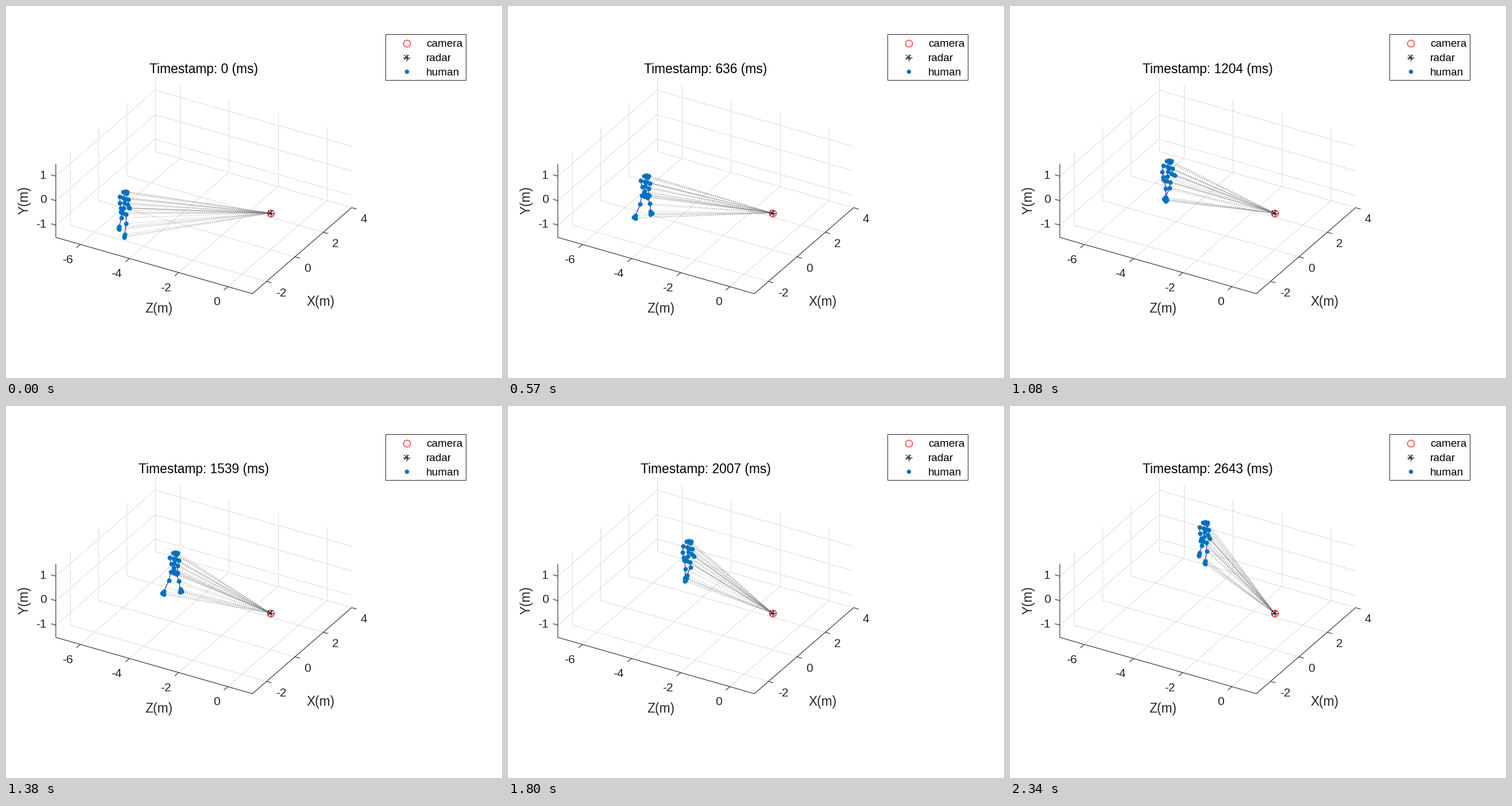
Recreate the animation shown at these times as a matplotlib script. Size 864 by 648 pixels, loop 2370 ms.

```python
import numpy as np
import matplotlib.pyplot as plt
from matplotlib.animation import FuncAnimation
from matplotlib.collections import LineCollection
from matplotlib.patches import Rectangle

W, H, FRAMES, STEP_MS = 864, 648, 79, 30
DARK, GRID, BLUE = "#262626", "#dbdbdb", "#0072bd"
plt.rcParams["font.family"] = "Liberation Sans"

# 72 dpi makes one point equal to one pixel; whole coordinates are pixel centres
fig = plt.figure(figsize=(W / 72, H / 72), dpi=72, facecolor="white")
ax = fig.add_axes([0, 0, 1, 1])
ax.set(xlim=(-0.5, W - 0.5), ylim=(H - 0.5, -0.5))
ax.axis("off")

ORIGIN = np.array([460, 360.1])
UX, UY, UZ = np.array([24.7, -21.4]), np.array([0, -42.7]), np.array([42.8, 12.25])


def project(x, y, z):
    return ORIGIN + x * UX + y * UY + z * UZ


def segments(segs, color, width=1.0, z=1, **kw):
    return ax.add_collection(LineCollection(segs, colors=color, linewidths=width, zorder=z, **kw))


def label(x, y, s, size, color=DARK, ha="center", va="baseline", **kw):
    return ax.text(x - 0.5, y - 0.5, s, fontsize=size, color=color, ha=ha, va=va, zorder=6, **kw)


def draw_axes():
    x0, x1, y0, y1, z0, z1 = -3, 4, -1.5, 1.5, -7, 1
    xs, ys, zs = (-2, 0, 2, 4), (-1, 0, 1), (-6, -4, -2, 0)
    grid = []
    for x in xs:
        grid.append([project(x, y0, z0), project(x, y0, z1)])
        grid.append([project(x, y0, z0), project(x, y1, z0)])
    for z in zs:
        grid.append([project(x0, y0, z), project(x1, y0, z)])
        grid.append([project(x1, y0, z), project(x1, y1, z)])
    for y in ys:
        grid.append([project(x0, y, z0), project(x1, y, z0)])
        grid.append([project(x1, y, z0), project(x1, y, z1)])
    segments(grid, GRID)

    lines = [[project(x0, y1, z0), project(x0, y0, z0), project(x0, y0, z1), project(x1, y0, z1)]]
    dx, dz = 0.28 * UX, 0.2 * UZ
    for x in xs:
        p = project(x, y0, z1)
        lines.append([p, p + dz])
        label(p[0] + (26 if x < 0 else 22), p[1] + 26.3, str(x), 21)
    for z in zs:
        p = project(x0, y0, z)
        lines.append([p, p - dx])
        label(p[0] - (22 if z < 0 else 18.5), p[1] + 33, str(z), 21)
    for y in ys:
        p = project(x0, y, z0)
        lines.append([p, p - dz])
        label(70.5, p[1] + 4.8, str(y), 21, ha="right")
    segments(lines, DARK, 1.1, 2)
    label(266.5, 534, "Z(m)", 22.7)
    label(548.5, 522, "X(m)", 22.7)
    label(32.5, 338.5, "Y(m)", 22.7, rotation=90, va="center")


def ring(x, y):
    ax.plot(x, y, "o", ms=12, mfc="none", mec="red", mew=1.1, zorder=5)


def star(x, y, r=6):
    a = np.arange(4) * np.pi / 4
    arms = r * np.c_[np.cos(a), np.sin(a)]
    segments([[(x - u, y - v), (x + u, y + v)] for u, v in arms], "black", 1.1, 5)


def draw_legend():
    ax.add_patch(Rectangle((660, 48), 140, 80, fc="white", ec=DARK, lw=1, zorder=4))
    ring(697, 64)
    star(697, 89)
    ax.plot(697, 113, "o", ms=7.4, color=BLUE, mew=0, zorder=5)
    for y, s in zip((71, 96, 121), ("camera", "radar", "human")):
        label(732, y, s, 19, "black", ha="left")


draw_axes()
draw_legend()
ring(*ORIGIN)
star(*ORIGIN)

# The pelvis follows a smooth curve through five points
PATH_T = [0, 19, 46, 60, 79]
PATH_X = np.polyfit(PATH_T, [203.5, 237, 291, 311.5, 336.5], 4)
PATH_Y = np.polyfit(PATH_T, [360, 331, 290, 269.5, 235.5], 4)

# Walking phase in degrees: about three strides, slightly uneven
PHASE_T = [0, 8, 19, 27, 46, 60, 79]
PHASE = [0, 130, 240, 395, 628, 880, 1078]

HEAD_PARTS = {"ear_l": (-4, 1), "ear_r": (3.8, 0.8), "nose": (2.3, 4.2), "neck": (-3.2, 11),
              "collar": (1.3, 12.6), "shoulder_l": (-10, 9.3), "shoulder_r": (5.8, 14.3)}

BONES = [("head", "neck"), ("neck", "chest"), ("chest", "spine"), ("spine", "pelvis"),
         ("pelvis", "hip_l"), ("pelvis", "hip_r"), ("chest", "collar"),
         ("neck", "shoulder_l"), ("collar", "shoulder_r")]
for s in "lr":
    for chain in (("shoulder_", "elbow_", "wrist_", "hand_"), ("hip_", "knee_", "ankle_", "toe_")):
        BONES += [(a + s, b + s) for a, b in zip(chain, chain[1:])]
    BONES.append(("ankle_" + s, "heel_" + s))


def add_leg(j, side, hip, swing, rising, leg):
    """Swing the foot along X, lifting it on its way forward and when it trails."""
    reach = 0.38 * swing - 0.1
    lift = 2 + 10 * max(0, rising) + 20 * max(0, -reach)
    j["hip_" + side] = j["pelvis"] + hip
    ankle = j["hip_" + side] + reach * UX + (0, leg - lift)
    knee = (j["hip_" + side] + ankle) / 2 + (0.03 + 0.007 * lift) * UX
    j["knee_" + side], j["ankle_" + side] = knee, ankle
    j["toe_" + side] = ankle + (np.clip(10 * reach, -3, 4), 3.3)
    j["heel_" + side] = ankle + (-0.3, 5)


def pose(t):
    shrink = 1 - 0.0011 * t
    angle = np.radians(np.interp(t, PHASE_T, PHASE))
    sin, cos = np.sin(angle), np.cos(angle)

    pelvis = np.array([np.polyval(PATH_X, t), np.polyval(PATH_Y, t)])
    trunk = np.array([3.5, -37.5 * shrink])
    j = {"pelvis": pelvis, "head": pelvis + trunk,
         "chest": pelvis + 0.47 * trunk, "spine": pelvis + 0.23 * trunk}
    for name, offset in HEAD_PARTS.items():
        j[name] = j["head"] + offset

    # Each arm swings against the leg on its own side
    j["elbow_l"] = j["shoulder_l"] + (-3 * sin, 10.5)
    j["wrist_l"] = j["elbow_l"] + (2.5 - 1.5 * sin, 9)
    j["hand_l"] = j["wrist_l"] + (0.5, 3.7)
    j["elbow_r"] = j["shoulder_r"] + (-1.5, 9)
    j["wrist_r"] = j["elbow_r"] + (2 + 3.5 * sin, 5 - 6.5 * sin)
    j["hand_r"] = j["wrist_r"] + (1.5, 1)

    add_leg(j, "l", (-4.5, -1.5), sin, cos, 37 * shrink)
    add_leg(j, "r", (5.2, 2), -sin, -cos, 37 * shrink)
    return j


rays = segments([], "#666666", 0.75, 3, linestyles=[(0, (1.4, 3))])
bones = segments([], "#0000ff", 1.1, 3.5)
dots, = ax.plot([], [], "o", ms=8, color=BLUE, mew=0, zorder=4)
title = label(344.3, 117, "", 22.7, "black")


def update(n):
    t = n + (n >= 70)  # one recorded sample is skipped late in the walk
    j = pose(t)
    points = np.array(list(j.values()))
    rays.set_segments([[p, ORIGIN] for p in points])
    bones.set_segments([[j[a], j[b]] for a, b in BONES])
    dots.set_data(points[:, 0], points[:, 1])
    title.set_text(f"Timestamp: {round(t * 33.4545)} (ms)")
    return rays, bones, dots, title


anim = FuncAnimation(fig, update, frames=FRAMES, interval=STEP_MS, repeat=True,
                     repeat_delay=0, blit=False)
plt.show()
```
